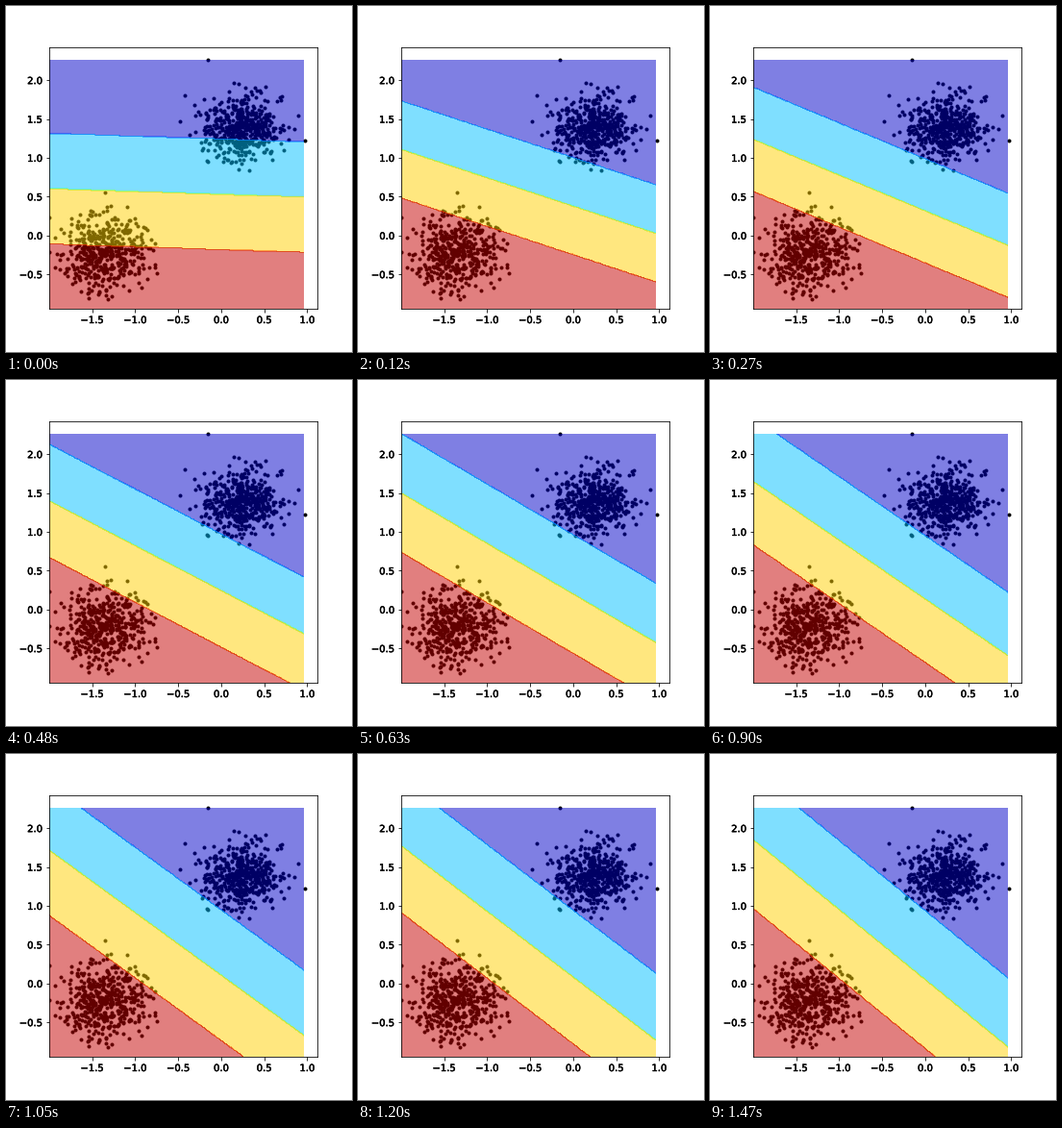
Write a matplotlib script that moves like this. It is 360x360 px and loops after 1500 ms.

```python
import numpy as np
import matplotlib.pyplot as plt
from matplotlib.animation import FuncAnimation
from matplotlib.patheffects import withStroke

FRAMES, INTERVAL = 50, 30
XMIN, XMAX, YMIN, YMAX = -1.998, 0.97, -0.944, 2.26
STEP = 0.01
# Nudged down so that each class value falls just above a level
LEVELS = np.arange(9) * 0.4 - 1e-6

rng = np.random.default_rng(7)


def blob(center, spread, n=500, reach=2.7):
    """Gaussian cluster without its far tail, kept inside the data range."""
    p = rng.normal(size=(n, 2))
    p = p[np.hypot(p[:, 0], p[:, 1]) < reach] * spread + center
    return np.clip(p, (XMIN, YMIN), (XMAX, YMAX))


strays = [(-0.155, YMAX), (XMAX, 1.22), (0.90, 1.54), (-0.42, 1.80),
          (-0.48, 1.47), (XMIN, 0.23), (-1.35, 0.55), (-0.75, -0.48)]
points = np.vstack([
    blob((0.24, 1.41), (0.24, 0.22)),
    blob((-1.36, -0.21), (0.25, 0.235)),
    strays,
])

gx, gy = np.meshgrid(np.arange(XMIN, XMAX, STEP), np.arange(YMIN, YMAX, STEP))


def labels(i):
    """Class of each grid node: weights settle along a slow and a fast mode."""
    slow, fast = np.exp(-0.0452 * i), 0.3 ** i
    wx = 1.080 - 0.591 * slow - 0.438 * fast
    wy = 1.055 + 0.654 * slow - 0.304 * fast
    yc = 0.512 + 0.068 * slow - 0.030 * fast
    score = wx * (gx + 0.519) + wy * (gy - yc)
    return np.digitize(-score, [-1, 0, 1])


fig = plt.figure(figsize=(5, 5), dpi=72, facecolor="white")
ax = fig.add_axes([0.125, 0.125, 0.775, 0.755])
ax.set(xlim=(XMIN, XMAX + 0.05 * (XMAX - XMIN)),
       ylim=(YMIN, YMAX + 0.05 * (YMAX - YMIN)),
       xticks=np.arange(-3, 3) * 0.5, yticks=np.arange(-1, 5) * 0.5)
for text in ax.get_xticklabels() + ax.get_yticklabels():
    text.set_path_effects([withStroke(linewidth=0.5, foreground="black")])
ax.scatter(*points.T, c="black", marker=".", s=36)

regions = None


def update(i):
    global regions
    if regions is not None:
        regions.remove()
    regions = ax.contourf(gx, gy, labels(i), levels=LEVELS, cmap="jet", alpha=0.5)
    return [regions]


anim = FuncAnimation(fig, update, frames=FRAMES, interval=INTERVAL,
                     init_func=lambda: [], repeat=True, repeat_delay=0)
plt.show()
```
